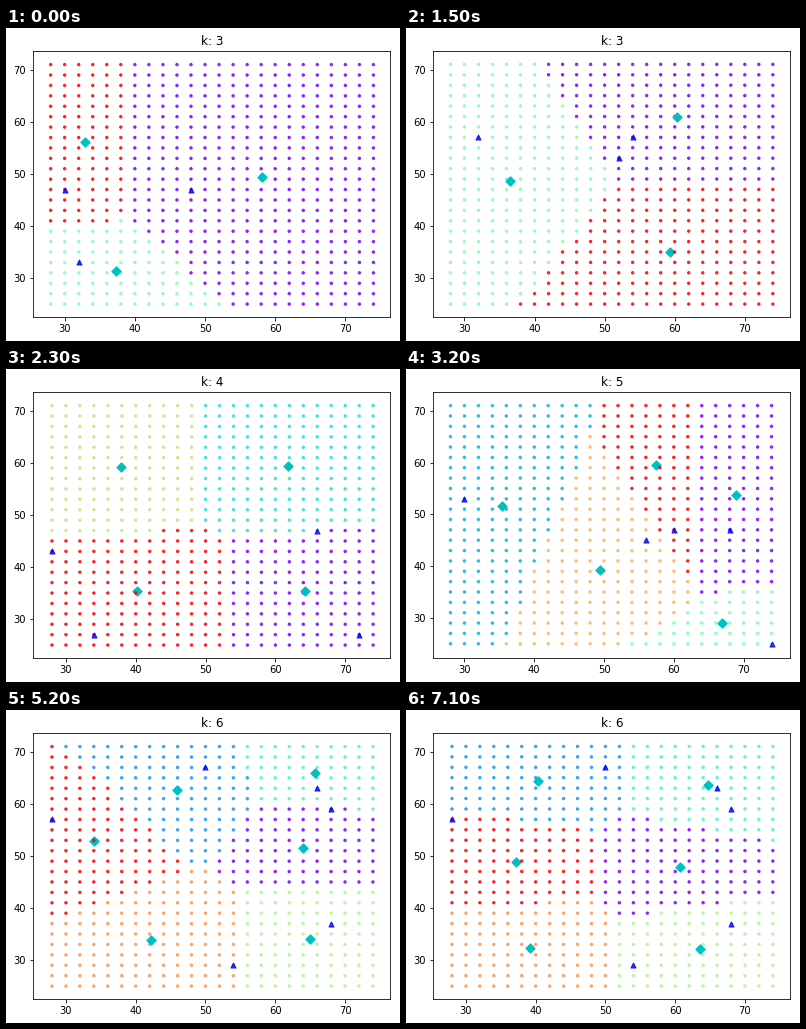
Write a matplotlib script that moves like this. It is 394x313 px and loops after 7300 ms.

```python
"""Lloyd's k-means on a square grid, one update per frame, for k = 3 to 6."""
import matplotlib.pyplot as plt
import numpy as np
from matplotlib.animation import FuncAnimation

W, H, DPI = 394, 313, 72
AX_LEFT, AX_BOTTOM = 27.2, 23.6
AX_SIZE = np.array([357.12, 266.1])
DOT, START, CENTRE = 6, 26, 44          # marker areas
STEP_MS = 100

GRID = np.array([(x, y) for x in range(28, 75, 2) for y in range(25, 72, 2)], float)
INNER = GRID[(GRID[:, 0] > 28) & (GRID[:, 0] < 74) & (GRID[:, 1] > 25) & (GRID[:, 1] < 71)]


def lloyd(starts):
    """All states (starts, labels, centres) until the centres stop moving."""
    starts = np.array(starts, float)
    centres, states = starts, []
    while True:
        dist = ((GRID[:, None] - centres[None]) ** 2).sum(axis=2)
        labels = dist.argmin(axis=1)
        moved = np.array([GRID[labels == i].mean(axis=0) if (labels == i).any() else c
                          for i, c in enumerate(centres)])
        states.append((starts, labels, moved))
        if np.array_equal(moved, centres):
            return states
        centres = moved


def head(starts, count):
    states = lloyd(starts)
    return [states[min(i, len(states) - 1)] for i in range(count)]


def tail(starts, count):
    return lloyd(starts)[-count:]


def random_starts(k, length, seed):
    """Random starting points whose run takes about the given number of steps."""
    rng = np.random.default_rng(seed)
    tries = [INNER[rng.choice(len(INNER), k, replace=False)] for _ in range(120)]
    return min(tries, key=lambda s: abs(len(lloyd(s)) - length))


timeline = (
    head([(48, 47), (32, 33), (30, 47)], 15)
    + tail([(54, 57), (32, 57), (52, 53)], 2)
    + tail(random_starts(3, 20, 4), 3)
    + head([(72, 27), (66, 47), (28, 43), (34, 27)], 12)
    + head([(68, 47), (30, 53), (74, 25), (56, 45), (60, 47)], 13)
    + tail(random_starts(5, 18, 7), 5)
    + head([(68, 59), (50, 67), (66, 63), (68, 37), (54, 29), (28, 57)], 23)
)


def view_limits(starts, labels, centres):
    """Grow the view layer by layer, padding each layer by its marker radius."""
    layers = []
    for i in range(len(centres)):
        layers += [(centres, CENTRE), (GRID[labels == i], DOT)]
    layers.append((starts, START))
    low, high = np.full(2, np.inf), np.full(2, -np.inf)
    span = np.ones(2)
    for pts, area in layers:
        if len(pts) == 0:
            continue
        pad = np.sqrt(area) / 2 * span / AX_SIZE
        low = np.minimum(low, pts.min(axis=0) - pad)
        high = np.maximum(high, pts.max(axis=0) + pad)
        span = 1.1 * (high - low)
    margin = 0.05 * (high - low)
    return low - margin, high + margin


fig = plt.figure(figsize=(W / DPI, H / DPI), dpi=DPI, facecolor="white")
ax = fig.add_axes([AX_LEFT / W, AX_BOTTOM / H, AX_SIZE[0] / W, AX_SIZE[1] / H])
title = ax.set_title("k: 3")
ax.set_xticks(range(30, 71, 10))
ax.set_yticks(range(30, 71, 10))

# The last cluster lies above the centre markers, the others below.
under = ax.scatter([], [], s=DOT, alpha=0.8, zorder=2)
diamonds = ax.scatter([], [], s=CENTRE, marker="D", color="c", zorder=3)
over = ax.scatter([], [], s=DOT, alpha=0.8, zorder=4)
triangles = ax.scatter([], [], s=START, marker="^", color="blue", alpha=0.8, zorder=5)


def draw(frame):
    starts, labels, centres = timeline[frame]
    k = len(centres)
    colors = plt.cm.rainbow(np.linspace(0, 1, k))[labels]
    last = labels == k - 1
    for dots, mask in ((under, ~last), (over, last)):
        dots.set_offsets(GRID[mask])
        dots.set_facecolor(colors[mask])
    diamonds.set_offsets(centres)
    triangles.set_offsets(starts)
    title.set_text(f"k: {k}")
    low, high = view_limits(starts, labels, centres)
    ax.set_xlim(low[0], high[0])
    ax.set_ylim(low[1], high[1])
    return under, diamonds, over, triangles, title


anim = FuncAnimation(fig, draw, frames=len(timeline), interval=STEP_MS,
                     repeat=True, blit=False, cache_frame_data=False)
plt.show()
```
